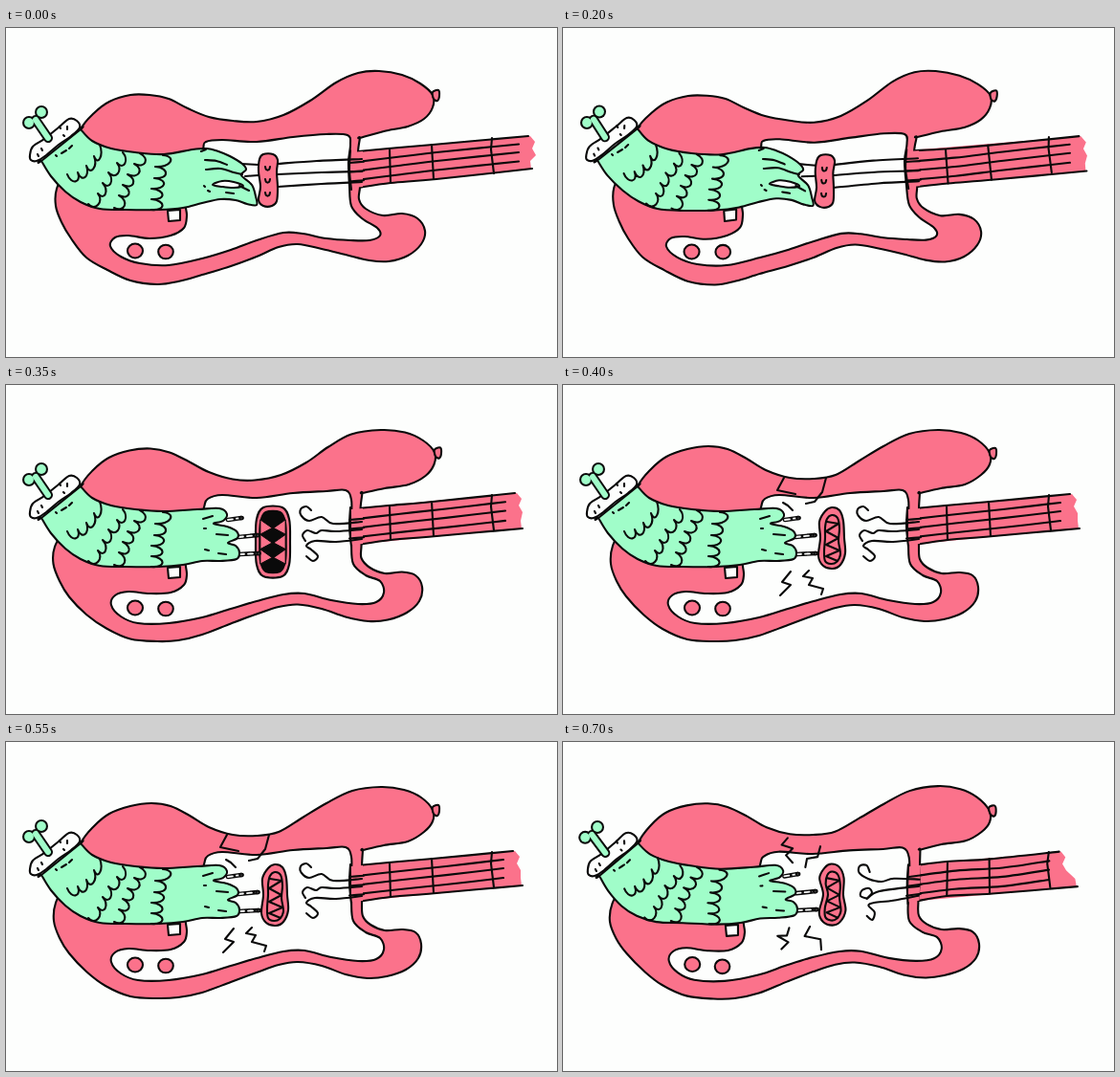
Recreate the animation shown at these times as an HTML page. Size 576 by 344 pixels, loop 750 ms.

```html
<!DOCTYPE html>
<html lang="en">
<head>
<meta charset="utf-8">
<title>Biting guitar</title>
<style>
html, body { margin: 0; width: 100%; height: 100%; overflow: hidden; background: #fdfefd; }
svg { display: block; width: 100vw; height: 100vh; }
</style>
</head>
<body>
<svg id="stage" viewBox="0 0 576 344" fill="none" stroke="#0a0a0a" stroke-width="2.1" stroke-linecap="round" stroke-linejoin="round"></svg>
<script>
const PINK = '#fb728b', GREEN = '#a0fdc9', WHITE = '#fdfefd', INK = '#0a0a0a';
const LOOP = 750, STEP = 50;
const nums = s => s.trim().split(/\s+/).map(Number);
const mix = (a, b, t) => a.map((v, i) => v + (b[i] - v) * t);

// Body outlines, clockwise from the wrist
const calm = nums(`78 106 92 89 108 77 130 70 150 70 170 74 190 84 212 93 237 97 262 98
  290 91 318 76 345 57 368 47 390 45 414 49 433 58 446 70 446 83 437 95 420 103 395 108
  370 115 370 115 368 130 369 150 370 166 369 179 376 189 394 196 414 194 430 199 438 212
  434 226 420 238 400 244 380 243 355 237 330 231 305 226 285 229 262 239 235 249 205 258
  180 265 158 268 130 264 106 253 84 240 68 220 58 203 52 186 53 168 66 140`);
const gaping = nums(`78 106 90 90 107 77 128 70 150 69 170 74 190 83 212 93 237 100 258 101
  290 94 318 83 338 66 360 52 392 47 418 49 438 58 450 70 449 83 440 96 422 104 397 108
  372 113 372 113 369 130 370 150 371 168 370 180 380 191 396 197 414 195 428 199 436 211
  433 226 420 238 400 246 380 247 355 242 330 234 305 229 285 231 262 238 235 248 205 260
  180 267 158 268 130 265 106 254 84 240 66 222 56 205 49 187 50 170 66 140`);
const bitten = nums(`78 106 92 88 108 75 130 67 152 64 172 67 192 77 212 89 237 97 262 98
  285 94 310 79 335 64 362 51 392 47 416 50 434 58 446 71 446 83 437 94 420 104 395 108
  373 113 373 113 372 130 372 150 372 168 373 182 381 191 396 197 414 196 428 199 434 211
  431 226 418 238 398 245 378 247 355 243 330 234 305 230 285 233 262 241 235 251 205 262
  180 267 158 268 130 266 104 255 84 240 66 221 56 205 50 187 52 168 66 140`);

const guardCalm = nums(`206 127 209 119 226 117 262 119 300 114 335 111 357 112 360 122 358 140
  359 165 361 186 372 199 388 209 391 217 380 222 360 222 335 220 310 215 290 214 262 222
  235 232 205 241 170 248 140 246 120 239 109 228 114 219 128 217 150 220 172 217 186 209
  189 196 188 180 200 160`);
const guardBitten = nums(`207 128 211 119 226 115 262 118 300 113 335 111 355 110 361 120 361 140
  361 165 363 187 376 199 391 205 395 217 387 227 368 229 340 225 312 218 290 219 262 226
  235 234 205 243 170 249 138 249 120 242 110 230 114 220 128 216 150 218 172 217 186 209
  189 198 188 180 200 160`);

const arm = nums(`160 190 125 190 98 189 78 182 62 171 47 155 37 139 37 139 78 106 78 106
  90 118 110 126 135 130 165 132`);
const wholeFingers = nums(`195 127 210 126 222 129 234 134 247 142 251 148 246 154 257 164 261 176
  262 185 252 184 240 180 224 179 205 183 185 188`);
const stumps = nums(`200 130 223 129 231 135 227 142 217 145 231 148 241 153 242 160 232 165
  240 168 244 175 241 182 224 184 205 184 185 188`);

const fur = [
  ['98 122 92 134 84 144 75 151 64 153', 3, 8],
  ['122 130 116 141 107 151 101 162 96 173 86 184', 5, 6],
  ['140 131 134 142 127 153 122 164 118 175 113 188', 8, 4],
  ['164 133 156 145 155 157 152 168 152 179 152 190', 11, 1]
];

// Loose string ends, each joining the neck at the right
const loose = {
  gaping: ['313 138 307 135 303 139 309 144 315 148 330 148 346 144 372 141',
    '313 160 312 155 317 153 319 157 314 160 325 157 345 153 372 150',
    '311 178 313 181 318 178 313 173 319 169 338 164 350 162 372 160'],
  bitten: ['319 131 314 127 308 130 309 137 317 142 330 138 342 145 372 143',
    '313 163 310 157 315 152 324 155 330 152 345 153 372 151',
    '314 179 321 184 326 179 319 172 314 168 323 163 345 164 372 161'],
  shaken: ['320 135 317 128 310 129 309 136 318 142 332 145 345 142 372 144',
    '317 163 310 160 312 154 319 152 322 157 317 163 330 155 372 151',
    '318 181 324 185 326 177 319 170 325 167 345 165 372 161']
};
const cracks = {
  bitten: ['231 97 224 110 243 114', '275 97 271 112 263 122 254 124', '230 123 235 126 240 131',
    '238 195 229 206 238 209 227 220', '257 194 251 200 261 202 257 209 272 213 270 219'],
  shaken: ['235 101 229 108 241 112 234 119 241 127', '270 110 267 121 256 123 254 132',
    '236 195 234 203 224 203 236 210 229 217', '258 194 253 204 270 207 271 218']
};

// Small smooth redraw wobble
let seed = 0;
function warp(p) {
  if (!seed) return p;
  return p.map((v, i) => {
    const x = p[i & ~1], y = p[i | 1];
    return v + (i & 1 ? Math.sin(x * .043 + seed * 2.1) : Math.sin(y * .06 + x * .02 + seed * 1.7));
  });
}

function curve(list, closed) {
  const p = warp(typeof list === 'string' ? nums(list) : list), n = p.length / 2;
  const at = i => {
    i = closed ? (i + n) % n : Math.max(0, Math.min(n - 1, i));
    return [p[2 * i], p[2 * i + 1]];
  };
  let d = 'M' + at(0);
  for (let i = 0; i < (closed ? n : n - 1); i++) {
    const [a, b, c, e] = [at(i - 1), at(i), at(i + 1), at(i + 2)];
    d += `C${b.map((v, k) => v + (c[k] - a[k]) / 6)} ${c.map((v, k) => v - (e[k] - b[k]) / 6)} ${c}`;
  }
  return d + (closed ? 'Z' : '');
}
const path = (d, fill = 'none', more = '') => `<path d="${d}" fill="${fill}" ${more}/>`;
const blob = (p, fill) => path(curve(p, true), fill);
const line = p => path(curve(p));
const poly = (s, fill) => path('M' + warp(typeof s === 'string' ? nums(s) : s).join(' ') + (fill ? 'Z' : ''), fill);
const dot = (x, y, r, fill) => {
  const [a, b] = warp([x, y]);
  return `<ellipse cx="${a}" cy="${b}" rx="${r}" ry="${r - .5}" fill="${fill}"/>`;
};

function neck([x1, y1, x2, y2]) {
  const left = [129, 167], lerp = (a, b, t) => a + (b - a) * t;
  const edge = [x1, y1, x1 + 5, y1 + 6, x1 + 2, y1 + 13, x1 + 6, y1 + 20, x2 - 2, y2 - 8, x2 - 1, y2];
  let out = path('M' + warp([362, left[0], ...edge, 362, left[1]]).join(' ') + 'Z', PINK, 'stroke="none"');
  out += line([368, left[0], 400, 126, 446, 122, x1 - 2, y1]);
  out += line([368, left[1], 402, 162, 450, 158, x2, y2]);
  [.3, .55, .8].forEach((t, k) => {
    const y = lerp(...left, t), end = lerp(y1, y2, [.25, .5, .78][k]);
    out += line([360, y + .5, 410, lerp(y, end, .3), 460, lerp(y, end, .6), x1 - 12, end]);
  });
  return out + poly('401 127 402 162') + poly('445 122 447 158') + poly('508 115 507 127 510 152');
}

function bridge() {
  let out = ['246 142 264 143', '250 155 264 154', '284 142 325 139 372 137', '284 153 330 151 372 150',
    '284 166 330 163 372 161'].map(line).join('');
  out += blob('265 137 269 132 279 132 284 138 283 150 284 167 283 181 278 186 269 186 264 180 266 166 264 150', PINK);
  return out + [145, 158, 172].map(y => line([271, y, 272, y + 3, 275, y + 3, 276, y])).join('');
}

function openMouth(cx, cy, w, h) {
  const ring = (a, b) => blob([-.55, -1, .55, -1, .95, -.65, 1, 0, .95, .65, .55, 1, -.55, 1, -.95, .65, -1, 0, -.95, -.65]
    .map((v, i) => i & 1 ? cy + v * b : cx + v * a), a === w ? PINK : INK);
  const iw = w * .76, ih = h * .86;
  let out = ring(w, h) + ring(iw, ih);
  for (const side of [-1, 1]) for (let k = -1; k <= 1; k++) {
    const y = cy + k * ih * .5, e = cx + side * iw * .94;
    out += path('M' + [e, y - ih * .24, cx + side * iw * .06, y + 1, e, y + ih * .24].join(' ') + 'Z', PINK, 'stroke-width="1"');
  }
  return out;
}

function shutMouth(shaken) {
  const bend = shaken ? 2 : 0;
  let out = blob([274, 132, 281, 128, 289, 131, 293, 142, 294 - bend, 160, 295, 176, 290, 188, 282, 192, 272, 189, 267, 179,
    269 + bend, 160, 268, 143], PINK);
  out += blob([276, 140, 281, 136, 287, 139, 289, 150, 288, 163, 290, 177, 286, 185, 280, 187, 274, 184, 273, 174,
    274 + bend, 160, 274, 149], PINK);
  return out + poly('276 143 288 145 275 153 288 160 275 167 289 173 275 179 287 184');
}

function boneEnds() {
  return [[232, 141, 246, 139], [243, 159, 263, 157], [244, 177, 264, 176]].map(([x, y, u, v]) => {
    const d = 'M' + warp([x, y, u, v]).join(' ');
    return path(d, 'none', 'stroke-width="4.6"') + path(d, 'none', `stroke="${WHITE}" stroke-width="1.8" stroke-dasharray="5 4"`) +
      dot(u, v, 1.8, WHITE);
  }).join('');
}

function feathers() {
  return fur.map(([s, u, v]) => {
    const p = warp(nums(s));
    let d = `M${p[0]} ${p[1]}`;
    for (let i = 2; i < p.length; i += 2) {
      const [x, y, a, b] = p.slice(i - 2, i + 2);
      d += `C${x + u * 1.4} ${y + v * 1.4} ${a + u * 1.4} ${b + v * 1.4} ${a} ${b}`;
    }
    return path(d);
  }).join('');
}

function wrist() {
  let out = blob('25 133 28 124 40 116 55 104 66 95 74 97 77 104 68 113 55 122 42 133 32 139 26 138', WHITE);
  out += ['33 132 34 134', '37 126 38 128', '56 103 57 105', '64 103 64 106', '60 112 61 113'].map(s => poly(s)).join('');
  const shaft = 'M' + warp([44, 115, 31, 96]).join(' ');
  const knobs = [[24, 99], [37, 88]].map(k => warp(k));
  const lobes = (r, c) => knobs.map(([x, y]) => `<circle cx="${x}" cy="${y}" r="${r}" fill="${c}" stroke="none"/>`).join('');
  return out + path(shaft, 'none', 'stroke-width="10"') + lobes(7, INK) +
    path(shaft, 'none', `stroke="${GREEN}" stroke-width="6"`) + lobes(4.9, GREEN);
}

function hand(cut) {
  let out = cut ? boneEnds() : '';
  out += blob([...arm, ...(cut ? stumps : wholeFingers)], GREEN) + feathers();
  if (cut) {
    out += ['206 140 216 137', '207 150 209 150', '208 172 212 173', '220 156 232 157', '222 176 230 177'].map(line).join('');
  } else {
    out += blob('216 164 226 160 238 161 248 165 238 167 226 166', WHITE);
    out += ['208 138 220 139 231 143', '209 148 224 147 238 151 247 153', '244 165 254 170', '204 129 209 127',
      '207 165 208 166', '211 170 213 171', '230 172 238 173'].map(line).join('');
  }
  out += ['58 131 63 128', '66 126 69 123', '52 133 53 134'].map(line).join('');
  return out + wrist();
}

function scene(f) {
  seed = f.seed || 0;
  const cut = f.end === 'bitten' || f.end === 'shaken';
  let out = neck(f.neck) + blob(f.body, PINK) + blob(f.guard, WHITE);
  out += path('M' + warp([361, 130, 373, 129, 373, 166, 361, 167]).join(' ') + 'Z', PINK, 'stroke="none"');
  out += line([360, 128, 359, 148, 361, 169]) + [140.5, 150, 160].map(y => line([359, y + .5, 374, y - .8])).join('');
  out += poly('169 191 182 190 182 201 170 202', WHITE);
  out += dot(135, 233, 8, PINK) + dot(167, 234, 7.8, PINK);
  const [bx, by] = [f.body[34], f.body[35]];
  out += blob([bx, by - 3, bx + 6, by - 5, bx + 7, by + 1, bx + 5, by + 6, bx + 1, by + 4], PINK);
  out += f.end ? loose[f.end].map(line).join('') : bridge();
  if (f.mouth) out += openMouth(...f.mouth);
  else if (f.end) out += shutMouth(f.end === 'shaken');
  if (cut && !f.mouth) out += cracks[f.end].map(s => poly(s)).join('');
  return out + hand(cut);
}

const rest = { body: calm, guard: guardCalm, neck: [548, 113, 550, 147] };
const redrawn = { ...rest, seed: 1, neck: [541, 113, 547, 149] };
const guardOpen = mix(guardCalm, guardBitten, .4);
const opening = { body: mix(calm, gaping, .5), guard: guardOpen, neck: [540, 112, 545, 150], end: 'gaping', mouth: [275, 165, 20, 35] };
const open = { body: gaping, guard: guardOpen, neck: [536, 112, 541, 150], end: 'gaping', mouth: [275.5, 168.5, 27.5, 43] };
const snap = { body: mix(gaping, bitten, .5), guard: guardBitten, neck: [534, 113, 540, 150], end: 'bitten', mouth: [279, 164, 18, 36] };
const shut = { body: bitten, guard: guardBitten, neck: [532, 114, 540, 150], end: 'bitten' };
const shake = { ...shut, seed: 3, neck: [521, 115, 538, 152], end: 'shaken' };

const cels = [rest, redrawn, rest, { ...rest, seed: 2 }, redrawn, opening, open, snap,
  shut, shake, { ...shut, seed: 2 }, shut, shake, shut, shake].map(scene);

const stage = document.getElementById('stage');
let shown = -1, start = null;
function draw(now) {
  if (start === null) start = now;
  const i = Math.floor(((now - start) % LOOP) / STEP);
  if (i !== shown) stage.innerHTML = cels[shown = i];
  requestAnimationFrame(draw);
}
stage.innerHTML = cels[0];
requestAnimationFrame(draw);
</script>
</body>
</html>
```
